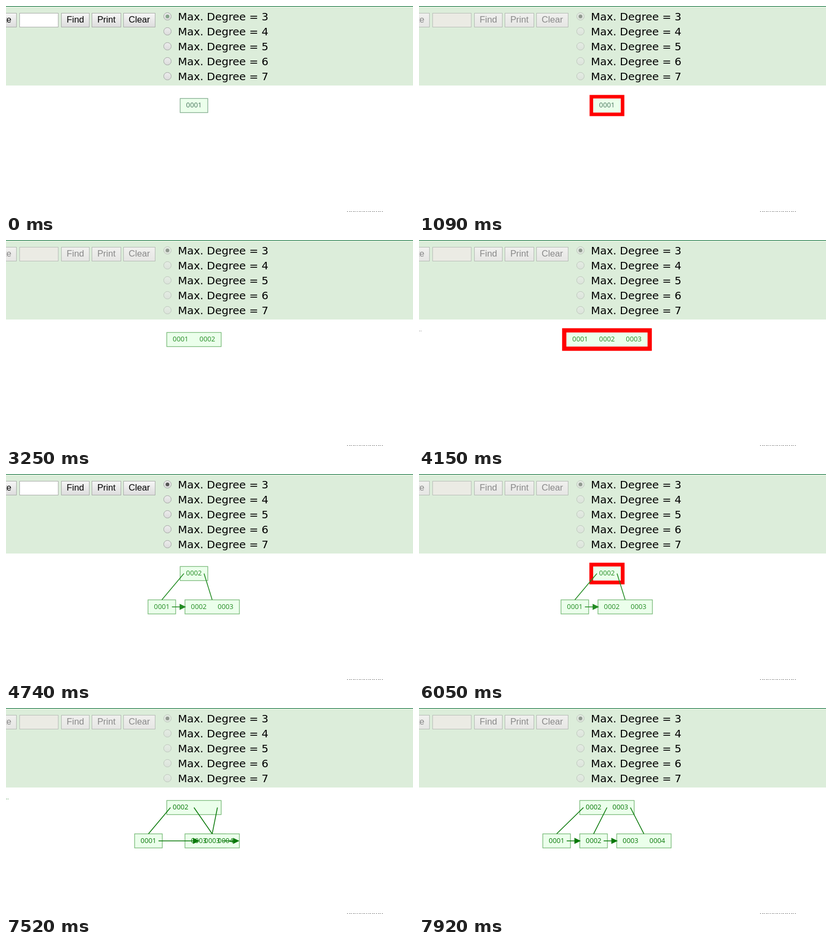
Write an HTML page with a canvas that moves like this. It is 760x386 px and loops after 8000 ms.

```html
<!DOCTYPE html>
<html lang="en">
<head>
<meta charset="utf-8">
<title>B+ tree insertion</title>
<style>
html, body { margin: 0; width: 100%; height: 100%; overflow: hidden; background: #fff; }
#stage { position: relative; width: 760px; height: 386px; overflow: hidden; }
#bar { position: absolute; inset: 0 0 auto; height: 149px; box-sizing: border-box;
  background: #dcedda; border-top: 1px solid #006633; }
#stage canvas { position: absolute; left: 0; top: 0; }
.btn, .field { position: absolute; top: 12px; height: 27px; box-sizing: border-box; border: 1px solid #a9aca9; }
.btn { font: 16.67px/23px "Liberation Sans", Arial, sans-serif; text-align: center; color: #000;
  background: linear-gradient(#f6f6f6, #dddddd); white-space: nowrap; }
.field { left: 25px; width: 73px; background: #fff; }
.radio { position: absolute; left: 294px; width: 15px; height: 15px; box-sizing: border-box;
  border: 1px solid #a2a4a2; border-radius: 50%; background: linear-gradient(#ececec, #dcdcdc); }
.radio.on::after { content: ""; position: absolute; left: 3px; top: 3px; width: 7px; height: 7px;
  border-radius: 50%; background: #555; }
.label { position: absolute; left: 321px; font: 20px/28px "DejaVu Sans", Verdana, sans-serif;
  color: #000; white-space: pre; }
.first .radio.on::after { background: #86a68b; }
.busy .btn { color: #888; border-color: #b4bab4; background: linear-gradient(#f0f0ee, #e6e6e4); }
.busy .field { background: #ebebe4; border-color: #b9beb9; }
.busy .radio { opacity: .55; }
</style>
</head>
<body>
<div id="stage">
  <div id="bar">
    <div class="btn" style="left:-48px;width:68px">Delete</div>
    <div class="field"></div>
    <div class="btn" style="left:103px;width:53px">Find</div>
    <div class="btn" style="left:160px;width:55px">Print</div>
    <div class="btn" style="left:219px;width:60px">Clear</div>
  </div>
  <canvas id="tree" width="760" height="386"></canvas>
</div>
<script>
const LOOP = 8000;
const ROOT_Y = 186.5, LEAF_Y = 249, HALF_H = 13.2, MID = 351;

// Moments at which the tree is repainted
const TICKS = [0, 1090, 1170, 1250, 1320, 1400,
  3650, 3730, 3800, 3880, 3960, 4040, 4150, 4200, 4270, 4340, 4420, 4480, 4570, 4650, 4740,
  6050, 6130, 6210, 6290, 6370, 6440, 6520, 6600, 6680, 6760, 6840,
  6920, 6990, 7060, 7140, 7220, 7290, 7370, 7440, 7520, 7620, 7680, 7750, 7840, 7920];

const stage = document.getElementById('stage');
const bar = document.getElementById('bar');
const ctx = document.getElementById('tree').getContext('2d');
let ink, rim;

for (let i = 0; i < 5; i++) {
  const radio = document.createElement('div');
  radio.className = i ? 'radio' : 'radio on';
  radio.style.top = 10.5 + 28 * i + 'px';
  const label = document.createElement('div');
  label.className = 'label';
  label.style.top = 5 + 28 * i + 'px';
  label.textContent = 'Max. Degree = ' + (i + 3);
  bar.append(radio, label);
}

const mix = (a, b, p) => a + (b - a) * p;
const progress = (t, from, to) => Math.min(1, Math.max(0, (t - from) / (to - from)));

// Highlight thickness swings between 4 and 8.2 px
function pulse(t) {
  const peak = t < 3000 ? 1250 : t < 5000 ? 4175 : 6800;
  const phase = Math.abs((t - peak) / 870) % 1;
  return 4 + 4.2 * Math.abs(1 - 2 * phase);
}

function node(x, y, keys) {
  const half = (50 * keys.length + 1.6) / 2;
  return { x, y, keys, left: x - half, right: x + half, top: y - HALF_H };
}

function write(text, x, y) {
  ctx.fillStyle = ink;
  ctx.fillText(text, x, y + 3.9);
}

function drawNode(n, glow = 0) {
  const w = n.right - n.left, h = 2 * HALF_H;
  if (glow) {
    ctx.fillStyle = '#ff0000';
    ctx.fillRect(n.left - glow, n.top - glow, w + 2 * glow, h + 2 * glow);
  }
  ctx.fillStyle = '#ebffeb';
  ctx.fillRect(n.left, n.top, w, h);
  if (!glow) {
    ctx.strokeStyle = rim;
    ctx.lineWidth = 1.25;
    ctx.strokeRect(n.left, n.top, w, h);
  }
  n.keys.forEach((key, i) => write(key, n.x + 50 * (i - (n.keys.length - 1) / 2), n.y));
}

function line(x1, y1, x2, y2, color = ink, width = 1.5) {
  ctx.strokeStyle = color;
  ctx.lineWidth = width;
  ctx.beginPath();
  ctx.moveTo(x1, y1);
  ctx.lineTo(x2, y2);
  ctx.stroke();
}

function link(parent, slot, child, glow = 0) {
  const x = mix(parent.left + 7, parent.right - 7, slot / parent.keys.length);
  if (glow) line(x, parent.y, child.x, child.top, '#e01208', glow * 0.8);
  line(x, parent.y, child.x, child.top, glow ? '#8a4a10' : ink);
}

function arrow(a, b) {
  const from = a.right - 7, y = a.y;
  const tip = from < b.left ? b.left + 2 : b.right;
  line(from, y, tip - 6, y);
  ctx.fillStyle = ink;
  ctx.beginPath();
  ctx.moveTo(tip, y);
  ctx.lineTo(tip - 12, y - 5.8);
  ctx.lineTo(tip - 12, y + 5.8);
  ctx.fill();
}

function drawSingle(t) {
  const keys = ['0001', '0002', '0003'].slice(0, t < 1400 ? 1 : t < 3960 ? 2 : 3);
  const lit = (t >= 1090 && t < 1400) || t >= 3650;
  drawNode(node(MID, ROOT_Y, keys), lit ? pulse(t) : 0);
}

function drawPair(t) {
  const drop = progress(t, 4340, 4740);
  const y = mix(ROOT_Y, LEAF_Y, drop);
  const full = t >= 7140;
  const leftX = full ? mix(291, 266, progress(t, 7140, 7520)) : mix(MID, 291, drop);
  const left = node(leftX, y, ['0001']);
  const right = node(mix(MID, 385, drop), y, full ? ['0002', '0003', '0004'] : ['0002', '0003']);
  const root = node(MID, ROOT_Y, ['0002']);
  const rootLit = t >= 6050 && t < 6840;
  drawNode(left);
  drawNode(right, t >= 6840 ? pulse(t) : 0);
  drawNode(root, rootLit ? pulse(t) : 0);
  link(root, 0, left);
  link(root, 1, right, rootLit && t >= 6440 ? pulse(t) : 0);
  arrow(left, right);
}

function drawTriple(t) {
  const p = progress(t, 7520, 7920);
  const root = node(MID, ROOT_Y, ['0002', p < 1 ? '' : '0003']);
  const leaves = [
    node(mix(266, 257, p), LEAF_Y, ['0001']),
    node(mix(385, 326, p), LEAF_Y, ['0002']),
    node(mix(385, 420, p), LEAF_Y, ['0003', '0004'])
  ];
  drawNode(root);
  leaves.forEach(leaf => drawNode(leaf));
  if (p < 1) write('0003', mix(385, 376, p), mix(LEAF_Y, ROOT_Y, p));
  leaves.forEach((leaf, i) => link(root, i, leaf));
  arrow(leaves[0], leaves[1]);
  arrow(leaves[1], leaves[2]);
}

function drawTree(t) {
  ctx.clearRect(0, 0, 760, 386);
  ctx.font = '12.8px "Open Sans", "Noto Sans", sans-serif';
  ctx.textAlign = 'center';
  ink = t < 1400 ? '#47735c' : t < 7140 ? '#228b22' : '#087808';
  rim = t < 1400 ? '#7fab8b' : '#76b876';

  // Tail of the status message
  if ((t >= 3960 && t < 4740) || (t >= 7140 && t < 7920)) {
    ctx.fillStyle = t < 5000 ? '#999' : '#5fa05f';
    for (let x = 0; x < 5; x += 3) ctx.fillRect(x, 170, 1.6, 1);
  }
  // Dotted edge at the bottom
  ctx.fillStyle = '#333';
  for (let x = 637; x < 703; x += 3.6) ctx.fillRect(Math.round(x), 385, 1.3, 1);

  if (t < 4340) drawSingle(t);
  else if (t < 7520) drawPair(t);
  else drawTriple(t);
}

let shown = -1;
function frame() {
  const t = performance.now() % LOOP;
  const busy = (t >= 690 && t < 1780) || (t >= 3250 && t < 4740) || t >= 5650;
  stage.classList.toggle('busy', busy);
  stage.classList.toggle('first', t < 690);
  const tick = TICKS.findLast(k => k <= t);
  if (tick !== shown) drawTree(shown = tick);
  requestAnimationFrame(frame);
}
frame();
</script>
</body>
</html>
```
